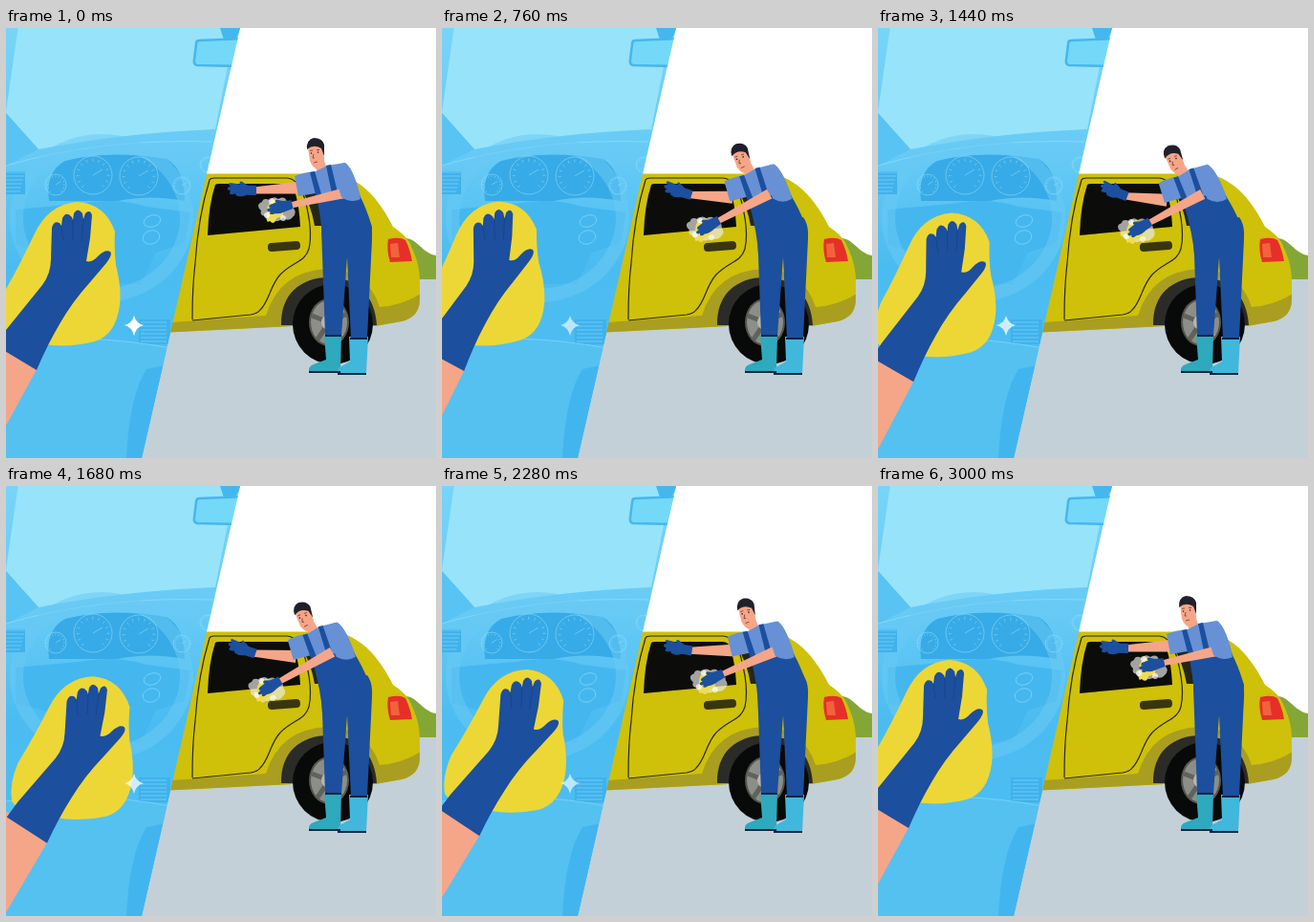
An HTML page for the animation above (3.04 s loop, 450 px wide and 450 px high).

```html
<!DOCTYPE html>
<html lang="en">
<head>
<meta charset="utf-8">
<title>Car cleaning</title>
<style>
html, body { margin: 0; width: 100%; height: 100%; overflow: hidden; background: #fff }
svg { display: block; width: 100vw; height: 100vh }
.line { fill: none; stroke: #a5e6fc; stroke-width: .8; opacity: .6 }
.seam { fill: none; stroke: #292a12; stroke-width: 1.2 }
.skin { fill: #f5a688 }
.navy { fill: #1c4f9e }
.shirt { fill: #6791d4 }
.olive { fill: #aa9e20 }
.sole { fill: none; stroke: #15243f; stroke-width: 1.8 }
</style>
</head>
<body>
<svg viewBox="0 0 450 450">
  <defs>
    <clipPath id="panel"><path d="M0 0H245L142 450H0Z"/></clipPath>
    <clipPath id="body"><path id="shell" d="M160 152.500H335C350 152 360 156 371 164C386 175 397 192 405 208Q417 216 422 224C429 238 433 250 433 264V284C433 296 427 304 414 307L386 312H300L160 319Z"/></clipPath>
    <linearGradient id="cabin" x2="0" y2="1">
      <stop stop-color="#78d4f8"/><stop offset=".3" stop-color="#66caf5"/><stop offset=".55" stop-color="#4bbcf1"/><stop offset="1" stop-color="#50bff1"/>
    </linearGradient>
  </defs>
  <rect width="450" height="450" fill="#fff"/>
  <path d="M395 263C398 232 406 221 418 220C430 220 436 236 450 238V264H395Z" fill="#83a637"/>
  <rect y="263" width="450" height="187" fill="#c3d0d7"/>

  <g id="car">
    <use href="#shell" fill="#cfc00a"/>
    <g clip-path="url(#body)">
      <path class="olive" d="M160 309L272 301Q286 254 337 252Q379 254 391 292Q414 291 436 277V325H160Z"/>
    </g>
    <path d="M288 311C287 279 308 261 338 261C370 261 386 282 388 311Z" fill="#2b2b27"/>
    <circle cx="342" cy="310" r="42" fill="#080909"/>
    <ellipse cx="338" cy="308" rx="21" ry="25" fill="#55574f"/>
    <ellipse cx="338" cy="308" rx="19" ry="23" fill="#8c8e87"/>
    <path d="M338 308V285M338 308L320 301M338 308L326 326M338 308L351 326M338 308L357 299" stroke="#60625c" stroke-width="5"/>
    <circle cx="338" cy="308" r="8" fill="#b7b8b2"/>
    <circle cx="338" cy="308" r="4" fill="#77796f"/>
    <path class="seam" d="M195 305Q195 270 198 246Q201 198 213 159Q214 157 218 157H294C302 157 309 166 313 180C318 199 320 218 317 231C313 245 301 244 287 258C276 270 276 285 266 295Q263 299 256 300L195 306"/>
    <path d="M219 164Q220 163 223 163H294Q300 163 302 170Q307 186 308 208L211 217Q212 185 219 164Z" fill="#0c0d0b"/>
    <path d="M308 167H325L331 207H323Q319 184 308 167Z" fill="#252615"/>
    <rect x="274" y="224" width="34" height="9" rx="4" fill="#39350f" transform="rotate(-4 291 229)"/>
    <path d="M400 221Q412 218 418 222Q423 232 425 244L402 245Q398 232 400 221Z" fill="#e62f28"/>
    <path d="M402 226L410 225L412 240H403Z" fill="#f2633d"/>
  </g>

  <g id="legs">
    <path d="M333 321H351L350 360H317Q316 354 322 352L335 347Z" fill="#2ea9bd"/>
    <path d="M359 323H379L377 362H347Q346 356 351 354L360 349Z" fill="#41b7dc"/>
    <path class="navy" d="M330 210L378 198Q384 206 383 221L378 325H361L357 240L351 322H334Z"/>
    <path class="sole" d="M317 360H350M347 362H377M334 322H351M360 325H378"/>
  </g>

  <path id="farArm" class="skin"/>
  <g id="farHand" class="navy">
    <path d="M2-5L-7-5L-14-9Q-17-9-15-6L-26-7Q-29-5-25-4L-28-2Q-29 1-25 1L-26 4Q-25 6-20 4L-19 6Q-14 8-8 5L2 5Z"/>
  </g>

  <g id="torso">
    <g id="head">
      <path class="skin" d="M322 139L331 132L337 151L327 155Z"/>
      <path class="skin" d="M316 125Q322 118 331 122L333 136Q333 147 327 148Q321 147 318 139Z"/>
      <path d="M315 127Q314 117 322 115Q331 115 333 122L333 134L330 126Q322 121 315 127Z" fill="#1f202c"/>
      <circle cx="319.500" cy="131" r=".8" fill="#20202f"/><circle cx="326.500" cy="130" r=".8" fill="#20202f"/>
      <path d="M318 128.500L321 128M325 127.500L328 127.500M322 132L321 136L323 136M322 141L326 140" fill="none" stroke="#89413b" stroke-width=".9"/>
    </g>
    <path class="shirt" d="M302 155Q311 151 324 150L336 144L355 141Q364 148 372 180L329 190L324 173L306 176Z"/>
    <path class="navy" d="M326 181L346 173L370 175Q377 188 383 208L382 233L331 235Q332 212 326 181ZM318 151L323 150L333 184L327 186ZM335 144L340 143L347 172L341 173Z"/>
  </g>

  <g id="foam">
    <path d="M-20 0Q-23-5-17-7Q-16-12-9-9Q-5-14 0-10Q7-14 9-7Q16-8 16 0Q20 4 15 9Q11 14 5 10Q-1 16-6 11Q-12 14-14 8Q-20 7-18 2Z" fill="#ededeb" opacity=".67"/>
    <path d="M-12 3Q-12-8-2-10Q6-10 5 0L5 8L-2 10Q-4 18-9 13Q-13 16-12 8Z" fill="#eddd55"/>
    <g fill="#fff" opacity=".7"><circle cx="-12" cy="7" r="3"/><circle cx="-7" cy="-8" r="3"/><circle cx="5" cy="10" r="3"/></g>
  </g>
  <path id="nearArm" class="skin"/>
  <g id="nearHand" class="navy">
    <path d="M14-5L5-6L-1-9Q-4-8-2-6L-9-5Q-12-3-9-2L-13-1Q-14 2-10 2L-11 4Q-10 6-6 5Q-1 7 6 5L14 4Z"/>
  </g>
  <path id="sleeve" class="shirt" d="M342 148Q348 140 356 142Q364 148 371 179Q361 184 351 177Q347 163 342 148Z"/>

  <g clip-path="url(#panel)">
    <rect width="250" height="450" fill="url(#cabin)"/>
    <path d="M13 0H240L219 106Q120 110 34 127L0 89Z" fill="#97e3fa"/>
    <path d="M0 89L34 127L0 144Z" fill="#59c3f3"/>
    <path class="line" d="M13 0L0 89M0 144Q100 115 216 119"/>
    <path d="M224 0H246L240 12H228Z" fill="#45b7ee"/>
    <path d="M202 13L248 11V40L200 39Q196 38 197 33L199 17Q199 13 202 13Z" fill="#74d8f9" stroke="#45b7ee" stroke-width="2.500"/>
    <path d="M45 181Q41 150 62 139Q107 127 168 137Q187 148 187 181Q150 174 117 181H45Z" fill="#37abe7"/>
    <path d="M10 190L76 184Q114 177 147 187L193 193L187 225L157 235L141 268H65L46 237L10 227Z" fill="#45b7ef"/>
    <ellipse cx="100" cy="199" rx="89" ry="81" fill="none" stroke="#6bcbf4" stroke-width="14" opacity=".55"/>
    <path d="M0 150H20V174H0ZM139 305H172V331H139Z" fill="#3fb2ec"/>
    <path d="M0 330Q80 318 173 335V450H0Z" fill="#54c1f1"/>
    <path d="M126 450Q129 385 147 357L166 353L145 450Z" fill="#43b5ee"/>
    <g class="line">
      <path d="M0 330Q80 318 173 335"/>
      <ellipse cx="153" cy="202" rx="9" ry="6" transform="rotate(-18 153 202)"/>
      <ellipse cx="152" cy="219" rx="9" ry="7" transform="rotate(-18 152 219)"/>
    </g>
    <g id="dials" class="line"></g>
    <path id="vents" class="line"/>
    <g id="arm">
      <path d="M29 217Q44 184 75 182Q104 184 114 213Q113 233 115 248Q121 271 119 290Q115 321 93 328Q66 335 39 331Q8 332-6 316Q-10 298-1 275Q16 245 29 217Z" fill="#edd736"/>
      <path class="skin" d="M-12 326L34 354L-58 522L-130 522Z"/>
      <path class="navy" d="M-11 332L0 316L38 269Q47 257 47 242L48 209Q50 201 56 204L58 207L59 199Q63 191 69 198L70 201L71 194Q75 187 80 194L81 200L83 194Q88 189 90 196L88 220L84 244Q90 246 96 239Q104 231 109 234Q112 237 105 246L88 266Q69 287 56 310Q43 332 32 358Z"/>
      <path d="M58 207L60 223M70 201L70 222M81 200L79 223" stroke="#174386" fill="none" stroke-width=".8"/>
    </g>
    <path id="star" d="M134 301Q136 309 144 311Q136 313 134 322Q132 313 124 311Q132 309 134 301Z" fill="#fff"/>
  </g>
</svg>
<script>
const $ = id => document.getElementById(id);
const put = (id, value, name = 'transform') => $(id).setAttribute(name, value);
const loop = 3040;
const times = [0, 440, 1080, 1440, 1960, 2560, 2840, loop];
const tracks = {
  thumbX: [109, 103, 91, 112, 131, 110, 109.5, 109],
  thumbY: [236, 234, 236, 247, 258, 236.5, 236, 236],
  tilt: [0, -.3, -4, -1, 4, .3, 0, 0],
  lean: [0, .41, 1, .95, .62, .13, 0, 0],
  handX: [286, 281, 275, 273, 279, 284, 286, 286],
  handY: [188, 204, 210, 210, 210, 194, 188, 188],
  glow: [1, .3, 1, .72, .75, .45, 0, 0]
};

// Smooth curve through unevenly spaced poses, at rest at both ends.
function sample(v, t) {
  const i = Math.max(0, times.findIndex(x => x > t) - 1);
  const slope = k => k < 1 || k > v.length - 2 ? 0 : (v[k + 1] - v[k - 1]) / (times[k + 1] - times[k - 1]);
  const span = times[i + 1] - times[i], u = (t - times[i]) / span;
  const ease = u * u * (3 - 2 * u);
  return v[i] + (v[i + 1] - v[i]) * ease + span * u * (1 - u) * ((1 - u) * slope(i) - u * slope(i + 1));
}

function limb(x1, y1, w1, x2, y2, w2) {
  const d = Math.hypot(x2 - x1, y2 - y1), nx = (y1 - y2) / d / 2, ny = (x2 - x1) / d / 2;
  return `M${x1 + nx * w1} ${y1 + ny * w1}L${x2 + nx * w2} ${y2 + ny * w2}L${x2 - nx * w2} ${y2 - ny * w2}L${x1 - nx * w1} ${y1 - ny * w1}Z`;
}

const dial = (x, y, r) => {
  let ticks = '';
  for (let a = 2.3; a < 7.2; a += .4) {
    const c = Math.cos(a), s = Math.sin(a);
    ticks += `M${x + c * r * .72} ${y + s * r * .72}L${x + c * r * .87} ${y + s * r * .87}`;
  }
  return `<circle cx="${x}" cy="${y}" r="${r}"/><path d="${ticks}M${x} ${y}L${x + r * .5} ${y - r * .3}"/>`;
};
$('dials').innerHTML = dial(91, 154, 20) + dial(139, 155, 20) + dial(52, 164, 11) + dial(184, 165, 9) + dial(211, 143, 8);
let slats = '';
for (let k = 0; k < 6; k++) slats += `M0 ${151 + k * 4}H${20 - k}M141 ${308 + k * 4}H168`;
put('vents', slats, 'd');

function draw(now) {
  const t = now % loop, p = {};
  for (const key in tracks) p[key] = sample(tracks[key], t);
  const s = p.lean, elbowX = 347 - 14 * s, elbowY = 175 + s;
  const angle = Math.atan2(elbowY - p.handY, elbowX - p.handX);
  const wristX = p.handX + 12 * Math.cos(angle), wristY = p.handY + 12 * Math.sin(angle);
  const farX = 260 - s, farY = 170 + 6 * s;
  const lean = `translate(0 ${s}) rotate(${-6.5 * s} 358 235)`;

  put('arm', `translate(${p.thumbX} ${p.thumbY}) rotate(${p.tilt}) translate(-109 -236)`);
  put('star', Math.max(0, p.glow), 'opacity');
  put('torso', lean);
  put('sleeve', lean);
  put('head', `rotate(${-10 * s} 332 152)`);
  put('farArm', limb(farX - 1, farY, 7, 310 - 8 * s, 167 + 14 * s, 13), 'd');
  put('farHand', `translate(${farX} ${farY}) rotate(${2 + 20 * s})`);
  put('foam', `translate(${p.handX - 1} ${p.handY + 1})`);
  put('nearArm', limb(wristX, wristY, 6, elbowX + 6, elbowY - 2, 11), 'd');
  put('nearHand', `translate(${p.handX} ${p.handY}) rotate(${angle * 180 / Math.PI})`);
}

function frame() {
  draw(performance.now());
  requestAnimationFrame(frame);
}
frame();
</script>
</body>
</html>
```
